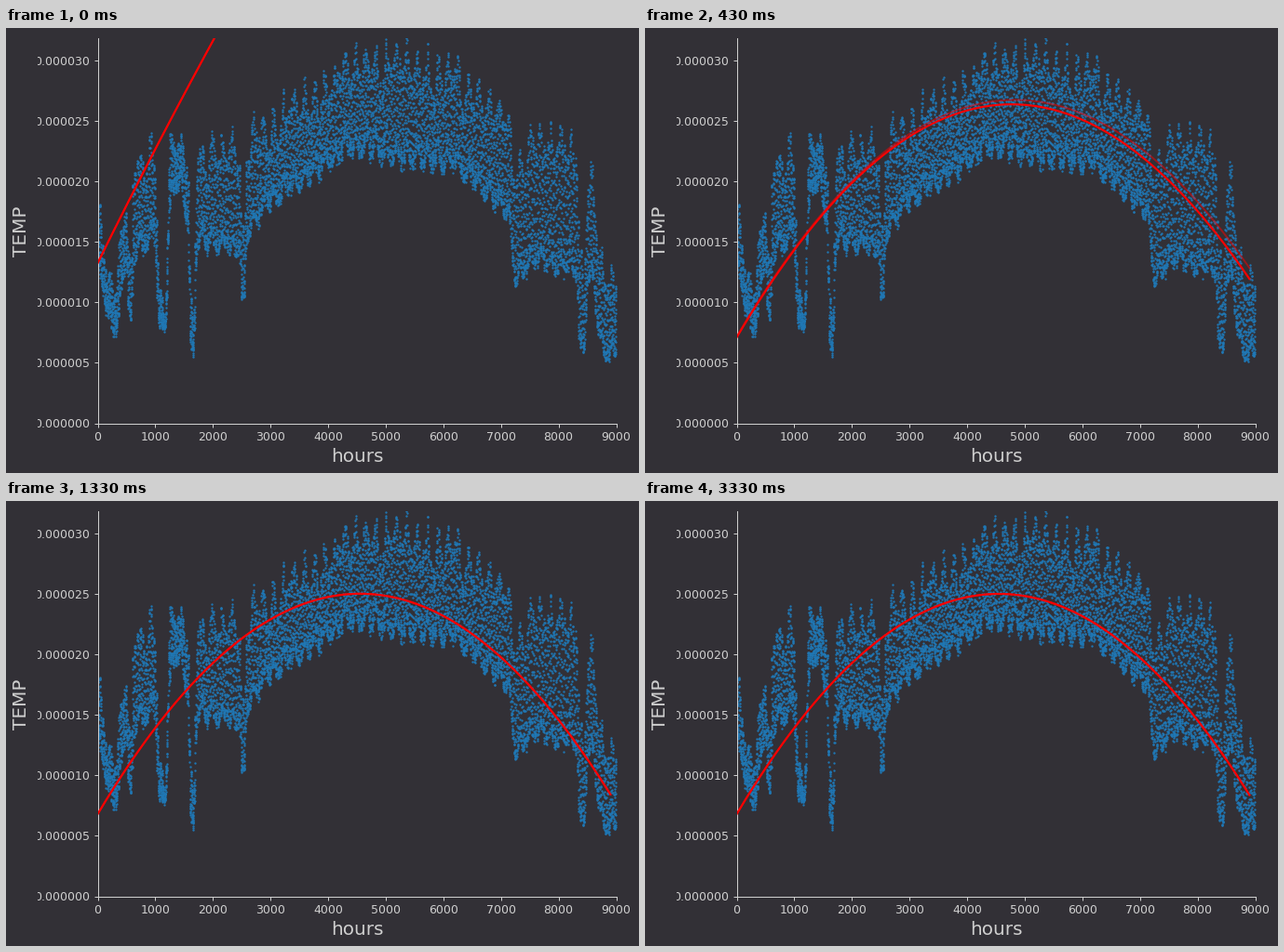
A matplotlib script that plays this animation: 680 by 479 pixels, repeating every 4010 ms.

```python
import numpy as np
import matplotlib.pyplot as plt
from matplotlib.animation import FuncAnimation
from matplotlib.transforms import Bbox

W, H = 680, 479
LEFT, RIGHT, TOP, BASE = 98.5, 655.5, 11.0, 425.5
PX_PER_UNIT = 13.02          # one unit is 1e-6 on the vertical axis
STEP_MS, LOOP_MS, LAST_STEP = 10, 4010, 100
BG, INK, BLUE = "#323036", "#cfcfcf", "#1f77b4"

# hour, usual warmest and coldest value
SEASON = [(0, 19, 11), (900, 24.5, 14), (1430, 25, 19), (1600, 24.5, 14.5),
          (2400, 25, 13.5), (3000, 27, 17.5), (4474, 31.8, 22),
          (5200, 32, 21), (6200, 31, 20.5), (7100, 27, 16.5),
          (7250, 23, 11), (7550, 25.5, 12.5), (8150, 25, 12), (9000, 20, 9)]
# cold snaps: middle hour, depth, half width
SNAPS = [(270, 7, 150), (560, 8, 45), (1120, 13, 100), (1640, 14, 55),
         (2520, 8, 45), (8400, 9, 70), (8850, 7, 200)]
SPELL_HOURS, WARM_SPELL = 178, 4474


def make_weather():
    """Hourly readings: a day cycle inside a slowly wandering band."""
    rng = np.random.default_rng(4)
    hours = np.arange(9000)
    day = hours // 24
    key, top, low = zip(*SEASON)
    warm, cold = np.interp(hours, key, top), np.interp(hours, key, low)

    # warm and cool spells, about a week apart
    phase = (hours - WARM_SPELL) / SPELL_HOURS
    cool = np.abs(np.sin(np.pi * phase))
    spell = np.floor(phase - phase.min()).astype(int)
    warm -= 2.8 * cool * rng.uniform(0.6, 1.5, spell.max() + 1)[spell]
    cold += 1.6 * (1 - cool)

    for middle, depth, width in SNAPS:
        snap = depth * np.exp(-((hours - middle) / width) ** 4)
        warm -= snap
        cold -= 0.7 * snap

    days = day[-1] + 1
    warm -= np.abs(rng.normal(0, 0.6, days))[day]
    cold += np.abs(rng.normal(0, 0.6, days))[day]
    cycle = (0.5 - 0.5 * np.cos(2 * np.pi * hours / 24)) ** 1.4
    return hours, cold + (warm - cold) * cycle + rng.normal(0, 0.18, hours.size)


def fit(step, x):
    """Quadratic settling towards the least squares solution."""
    fast, slow = 0.79 ** step, 0.94 ** step
    a = 6.8 + 6.45 * fast
    b = 8.0 + 1.65 * fast
    c = -0.879 + 0.64 * fast + 0.006 * slow
    return a + b * x + c * x * x


fig = plt.figure(figsize=(W / 100, H / 100), dpi=100, facecolor=BG)
plt.rcParams["font.family"] = "DejaVu Sans"
ax = fig.add_axes([LEFT / W, 1 - BASE / H, (RIGHT - LEFT) / W, (BASE - TOP) / H],
                  facecolor=BG)
ax.set_xlim(0, 9000)
ax.set_ylim(0, (BASE - TOP) / PX_PER_UNIT)


def draw_chart():
    ax.plot(*make_weather(), "o", color=BLUE, ms=1.7, mew=0)
    ax.spines[["top", "right"]].set_visible(False)
    for side in ("left", "bottom"):
        ax.spines[side].set(color=INK, linewidth=0.72)
    ticks = np.arange(0, 31, 5)
    ax.set_xticks(np.arange(0, 9001, 1000))
    ax.set_yticks(ticks, [f"{v / 1e6:.6f}" for v in ticks])
    ax.tick_params(color=INK, labelcolor=INK, labelsize=9,
                   length=3.15, width=0.72, pad=3.15)
    # tick labels are cut off at the left and lower edge
    window = Bbox([[34, H - 444], [W, H]])
    for label in ax.get_xticklabels() + ax.get_yticklabels():
        label.set_clip_on(True)
        label.set_clip_box(window)
    style = dict(color=INK, fontsize=14.4, ha="center", va="baseline",
                 rotation_mode="anchor")
    fig.text(377 / W, 1 - 467 / H, "hours", **style)
    fig.text(22 / W, 1 - 219 / H, "TEMP", rotation=90, **style)


def freeze_chart():
    """Keep the static chart as one backdrop so that frames draw quickly."""
    fig.canvas.draw()
    backdrop = np.asarray(fig.canvas.buffer_rgba()).copy()
    for artist in list(ax.lines) + list(fig.texts):
        artist.remove()
    ax.set_axis_off()
    fig.figimage(backdrop, zorder=-1)


draw_chart()
freeze_chart()

span = np.linspace(0, 8900, 200)
trail, = ax.plot([], [], color="red", lw=1.4, alpha=0.5)
curve, = ax.plot([], [], color="red", lw=1.55)


def update(i):
    step = min(int((i * STEP_MS + 5) * 3 / 100), LAST_STEP)
    curve.set_data(span, fit(step, span / 1000))
    trail.set_data(span, fit(max(step - 1, 0), span / 1000))
    return trail, curve


anim = FuncAnimation(fig, update, frames=LOOP_MS // STEP_MS, interval=STEP_MS,
                     repeat=True, repeat_delay=0)
plt.show()
```
